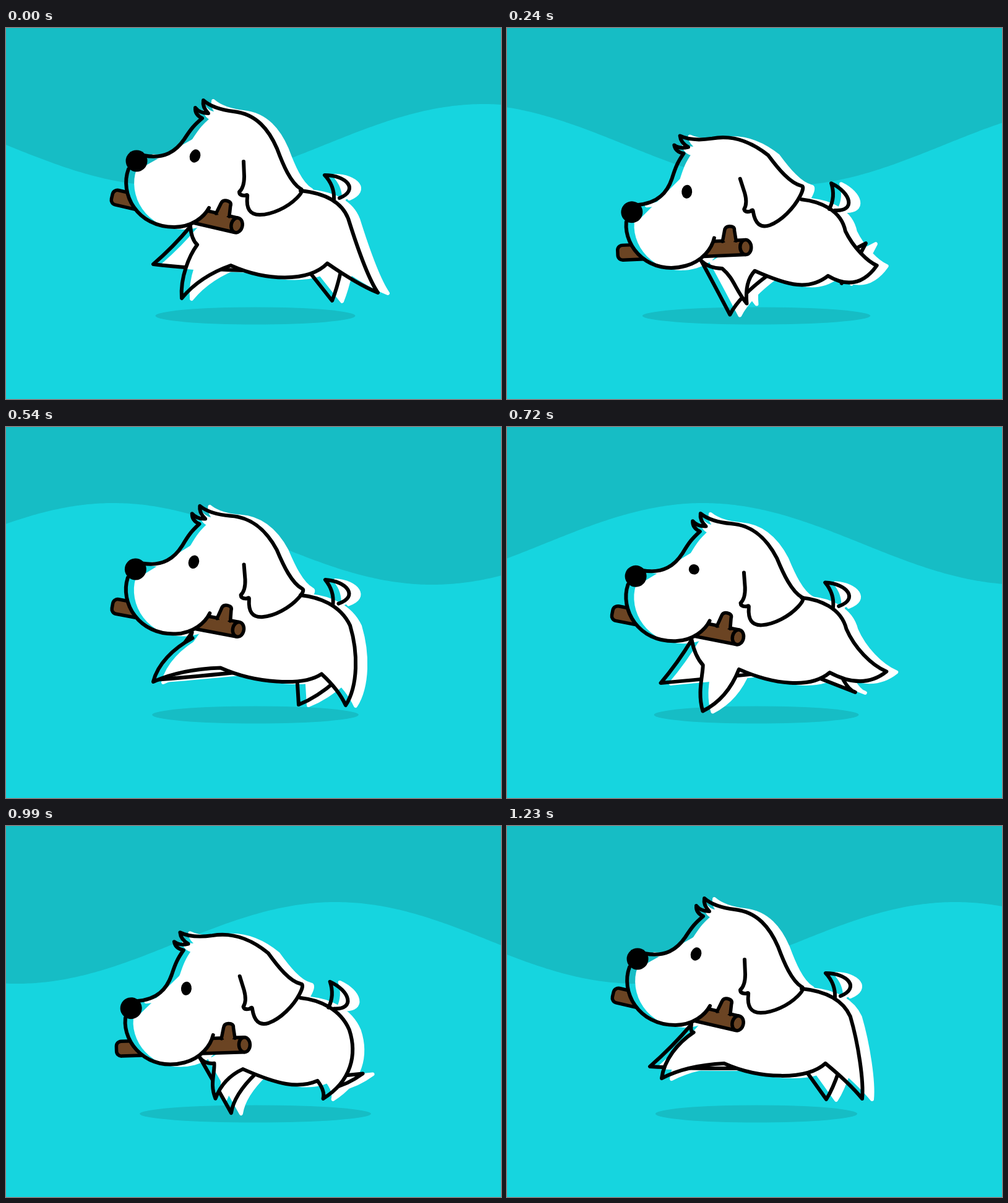
Recreate the animation shown at these times as an HTML page with a canvas. Size 800 px wide and 600 px high, loop 1260 ms.

```html
<!DOCTYPE html>
<html lang="en">
<head>
<meta charset="utf-8">
<title>Running dog</title>
<style>
  html, body { margin: 0; width: 800px; height: 600px; overflow: hidden; background: #16d5df; }
  canvas { display: block; }
</style>
</head>
<body>
<canvas id="stage" width="800" height="600"></canvas>
<script>
const ctx = document.getElementById('stage').getContext('2d');
const LOOP = 1260, STEP = 30, WAVE = 1290, STRIDE = WAVE / 2;
const LOW = '#16d5df', HIGH = '#16bdc5', BARK = '#6b4423';
const TAU = Math.PI * 2, RAD = Math.PI / 180;

// Key poses of one stride: only the head, the bob of the back and the paw tips
// are keyed, the rest of the dog follows from them.
const TIMES = [0, 120, 225, 360, 465, 540, 585];
const HEAD = [[215, 0], [259, -4.1], [296, -15], [293, -14.5], [268, -9.5], [230, -2.3], [215, 0]]; // y, tilt
const BOB = [[0], [21], [16], [17], [23], [10], [0]];
const HIND = [[601, 428], [616, 380], [606, 379], [505, 447], [509, 464], [549, 450], [574, 441]];
const FRONT = [[284, 437], [336, 466], [389, 447], [331, 440], [276, 433], [238, 412], [250, 408]];
const FAR_HIND = [[527, 441], [580, 415], [580, 347], [570, 408], [452, 457], [473, 449], [516, 442]];
const FAR_FRONT = [[238, 382], [264, 434], [355, 462], [361, 463], [304, 444], [240, 409], [231, 389]];

// Fixed curves, drawn for the head at rest with the nose at (211, 215)
const CROWN = [222, 206, 256, 213, 275, 199, 288, 180, 299, 163, 304, 157, 317, 146,
  305, 140, 306, 129, 313, 138, 327, 138, 317, 128, 319, 117, 335, 131, 368, 135];
const EAR = [405, 139, 425, 165, 438, 195, 448, 222, 460, 250, 476, 260, 482, 263, 470, 275,
  455, 290, 430, 302, 410, 302, 394, 302, 388, 292, 390, 273, 391, 268, 386, 271,
  377, 271, 377, 265, 385, 258, 385, 240, 384, 216];
const CHIN = [328, 291, 320, 306, 300, 322, 272, 322, 212, 322, 183, 268, 198, 228];

const SIZE = { M: 1, L: 1, Q: 2, C: 3 };

function shape(cmds, pts) {
  let d = '', i = 0;
  for (const c of cmds) {
    d += c + pts.slice(i, i += SIZE[c] * 2).join(' ');
  }
  return new Path2D(d);
}

const chin = shape('MCC', CHIN);
const cheek = shape('MLLLLCC', [310, 165, 410, 165, 410, 285, 330, 320, ...CHIN]);
const tail = shape('MQC', [0, 0, 1, -22, -15, -39, 21, -39, 41, -15, 9, -2]);
const twig = shape('MLQQL', [-37, -11, -33, -28, -32, -35, -25, -35, -16, -35, -17, -28, -15, -11]);

const off = ([x, y], dx, dy) => [x + dx, y + dy];
const mid = ([ax, ay], [bx, by], dx, dy) => [(ax + bx) / 2 + dx, (ay + by) / 2 + dy];

// Smooth cyclic interpolation through the key poses
function pose(track, p) {
  const n = TIMES.length;
  const time = k => TIMES[(k + n) % n] + Math.floor(k / n) * STRIDE;
  const row = k => track[(k + n) % n];
  let k = n - 1;
  while (TIMES[k] > p) k--;
  const t0 = time(k), t1 = time(k + 1), h = t1 - t0, u = (p - t0) / h;
  const a = row(k - 1), b = row(k), c = row(k + 1), d = row(k + 2);
  const sa = h / (t1 - time(k - 1)), sb = h / (time(k + 2) - t0);
  return b.map((v, i) => {
    const m0 = (c[i] - a[i]) * sa, m1 = (d[i] - v) * sb, w = c[i] - v;
    return v + u * (m0 + u * (3 * w - 2 * m0 - m1 + u * (m0 + m1 - 2 * w)));
  });
}

function makeCrown(lift) {
  const ear = EAR.slice();
  for (let i = 0; i < ear.length; i += 2) {
    const x = EAR[i], k = lift * Math.min(1, (EAR[i + 1] - 135) / 60);
    ear[i] += 10 * k;
    ear[i + 1] -= k * (6 + Math.max(0, x - 400) * .09);
  }
  return shape('MCCQQQQCCQCCQQQL', [...CROWN, ...ear]);
}

// Trunk with the near legs, and the two far legs, hung between chest and paws
function makeBody(p, bob, chest) {
  const hind = pose(HIND, p), front = pose(FRONT, p);
  const [hx, hy] = hind, [fx, fy] = front;

  const rump = [553 + (hy - 428) * .14, 308 + bob * 1.3];
  const crotch = [512 + (hx - 560) * .18, 385 + bob * 1.25 + (565 - hx) * .12];
  const elbow = [369 + (fx - 300) * .36, 384 + bob * .55];
  const pull = Math.max(0, Math.cos(TAU * p / STRIDE - 50 * RAD));
  const knee = [chest[0] + 8 + (fx - 270) * .22, chest[1] + 9 + 32 * pull];
  const reach = knee[0] - fx, plant = Math.max(0, fy - 448);

  const body = shape('MCCQCQCQ', [
    [476, 263 + bob * .9],
    [505, 266 + bob * .9], [540, 275 + bob * 1.2], rump,
    off(rump, 13, 15 + (hy - rump[1]) * .22),
    off(hind, (578 - hx) * .7, (370 - hy) * .4), hind,
    mid(hind, crotch, 8, Math.max(0, 445 - hy) * .6), crotch,
    [crotch[0] - 31, 412 + bob * .8], off(elbow, 56, 25), elbow,
    mid(elbow, front, plant * 1.8 - 10, plant * 2 - 9), front,
    off(front, reach * .25 - 9, (knee[1] - fy) * .4), off(knee, -reach * .5, 17), knee,
    mid(knee, chest, -4, 6), chest
  ].flat());

  const leg = (root, tip, end, sx, sy, ex, ey, core) => {
    const pts = [root, mid(root, tip, sx, sy), tip, mid(tip, end, ex, ey), end];
    return { ink: shape('MQQ', pts.flat()), coat: shape('MQQL', [...pts, core].flat()) };
  };
  const far = [
    leg(chest, pose(FAR_FRONT, p), off(elbow, 20, 8), 2, 3, -15, 2, [370, 360]),
    leg(off(crotch, -40, 0), pose(FAR_HIND, p), off(crotch, 22, 12), 0, 0, 0, 7, [510, 360])
  ];
  return { body, far };
}

function within(...steps) {
  ctx.save();
  steps.forEach(fn => fn());
  ctx.restore();
}

function clipOutside(path) {
  const outside = new Path2D();
  outside.rect(-800, -600, 2400, 1800);
  outside.addPath(path);
  ctx.clip(outside, 'evenodd');
}

function paint(path) {
  ctx.fill(path);
  ctx.stroke(path);
}

function ellipse(x, y, rx, ry, tilt = 0) {
  const path = new Path2D();
  path.ellipse(x, y, rx, ry, tilt, 0, TAU);
  return path;
}

function drawHills(t) {
  ctx.fillStyle = LOW;
  ctx.fillRect(0, 0, 800, 600);
  ctx.fillStyle = HIGH;
  ctx.beginPath();
  ctx.moveTo(0, 0);
  for (let x = 0; x <= 800; x += 4) {
    ctx.lineTo(x, 189 - 66 * Math.sin(TAU * (t / WAVE - x / 1030)));
  }
  ctx.lineTo(800, 0);
  ctx.fill();
}

function drawStick() {
  clipOutside(chin);
  ctx.translate(373, 319);
  ctx.rotate(13 * RAD);
  ctx.fillStyle = BARK;
  ctx.lineWidth = 5.5;
  const log = new Path2D();
  log.roundRect(-207, -12, 208, 24, [8, 2, 2, 8]);
  paint(log);
  paint(twig);
  ctx.fillRect(-33, -14, 14, 8);
  paint(ellipse(0, 0, 9, 12));
}

function drawFace(p) {
  ctx.stroke(chin);
  ctx.fill(ellipse(211, 215, 17.5, 17.5));
  const open = Math.min(1, Math.abs(p - 120) / 60);
  ctx.fill(ellipse(305.5, 207, 8.5, Math.max(.8, 11 * open), 20 * RAD));
}

function draw(t) {
  const p = t % STRIDE;
  const [bob] = pose(BOB, p);
  const [headY, tilt] = pose(HEAD, p);
  const headX = 211 - (headY - 215) / 9;
  const place = (x, y, deg) => () => {
    ctx.translate(x, y);
    ctx.rotate(deg * RAD);
  };
  const onNose = place(headX, headY, tilt);
  const onHead = () => { onNose(); ctx.translate(-211, -215); };
  const onTail = place(headX + 319, 277 + bob, tilt * -1.65);

  const cos = Math.cos(tilt * RAD), sin = Math.sin(tilt * RAD);
  const chest = [headX + 87 * cos - 106 * sin, headY + 87 * sin + 106 * cos];
  const { body, far } = makeBody(p, bob, chest);
  const crown = makeCrown(Math.sin(tilt / -15 * Math.PI / 2));

  drawHills(t);
  ctx.fillStyle = HIGH;
  ctx.fill(ellipse(403, 465.5, 174.5 - 13 * Math.cos(TAU * (p + 8) / STRIDE), 14));

  ctx.lineWidth = 6;
  ctx.lineCap = ctx.lineJoin = 'round';

  // White coat, printed slightly off register
  within(() => {
    ctx.translate(16, 1);
    ctx.fillStyle = ctx.strokeStyle = '#fff';
    far.forEach(leg => paint(leg.coat));
    paint(body);
    within(onTail, () => paint(tail));
    within(onHead, () => { paint(crown); paint(cheek); });
  });

  // Ink
  ctx.fillStyle = ctx.strokeStyle = '#000';
  within(() => {
    clipOutside(body);
    far.forEach(leg => ctx.stroke(leg.ink));
  });
  within(onTail, () => ctx.stroke(tail));
  ctx.stroke(body);
  within(onHead, () => {
    within(drawStick);
    ctx.stroke(crown);
    drawFace(p);
  });
}

const start = performance.now();
function tick() {
  const t = (performance.now() - start) % LOOP;
  draw(Math.floor(t / STEP) * STEP);
  requestAnimationFrame(tick);
}
tick();
</script>
</body>
</html>
```
